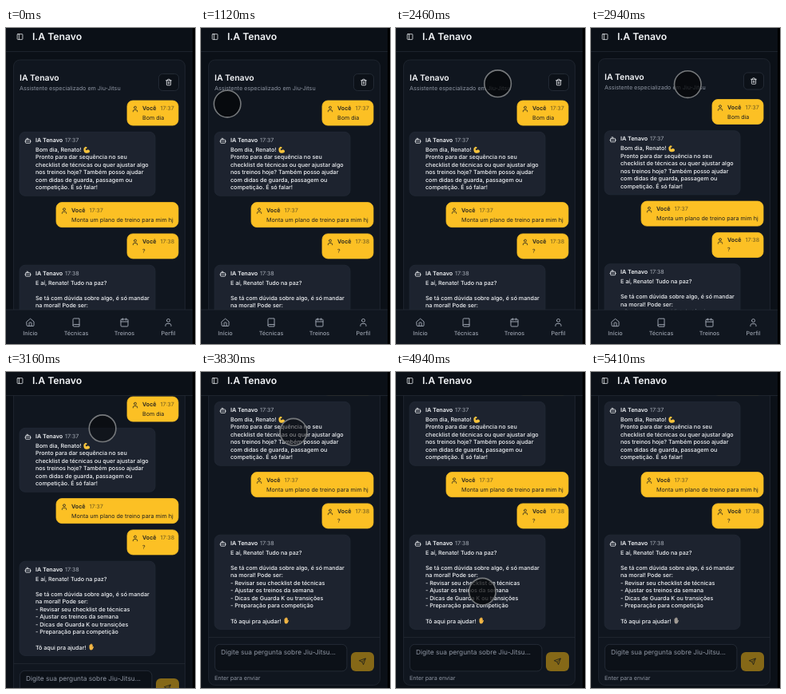
An HTML page that plays this animation: 237 px wide and 396 px high, repeating every 7.26 s.

```html
<!DOCTYPE html>
<html lang="pt-BR">
<head>
<meta charset="utf-8">
<title>Chat</title>
<style>
  html, body { margin: 0; height: 100%; overflow: hidden; background: #000; }
  svg { display: block; width: 100vw; height: 100vh; font: 7.15px Inter, sans-serif; text-rendering: geometricPrecision; }
</style>
</head>
<body>
<svg id="stage" viewBox="0 0 237 396"></svg>
<script>
const LOOP = 7260;
const BOT = 'IA Tenavo';
const WHITE = '#f5f7fa', MUTED = '#8f96a3', AMBER = '#fcc024', INK = '#20201f';
const PAGE = '#0b1017', CARD = '#10161f', FIELD = '#0c1118', LINE = '#222933', EDGE = '#29303b';
const LINE_HEIGHT = 9.55, GAP = 8.3;

// Icons on a 24-unit grid
const icons = {
  panel: 'M5 3h14a2 2 0 0 1 2 2v14a2 2 0 0 1-2 2H5a2 2 0 0 1-2-2V5a2 2 0 0 1 2-2zM9 3v18',
  trash: 'M3 6h18M19 6v14a2 2 0 0 1-2 2H7a2 2 0 0 1-2-2V6m3 0V4a2 2 0 0 1 2-2h4a2 2 0 0 1 2 2v2M10 11v6M14 11v6',
  user: 'M19 21v-2a4 4 0 0 0-4-4H9a4 4 0 0 0-4 4v2M8 7a4 4 0 1 0 8 0a4 4 0 1 0-8 0',
  bot: 'M12 8V4H8M6 8h12a2 2 0 0 1 2 2v8a2 2 0 0 1-2 2H6a2 2 0 0 1-2-2v-8a2 2 0 0 1 2-2zM2 14h2M20 14h2M15 13v2M9 13v2',
  home: 'M15 21v-8a1 1 0 0 0-1-1h-4a1 1 0 0 0-1 1v8M3 10l9-7.5 9 7.5v9a2 2 0 0 1-2 2H5a2 2 0 0 1-2-2z',
  book: 'M4 19.5v-15A2.5 2.5 0 0 1 6.5 2H20v20H6.5a2.5 2.5 0 0 1 0-5H20',
  calendar: 'M8 2v4M16 2v4M3 10h18M5 4h14a2 2 0 0 1 2 2v14a2 2 0 0 1-2 2H5a2 2 0 0 1-2-2V6a2 2 0 0 1 2-2z',
  send: 'M22 2L15 22l-4-9-9-4zM22 2L11 13'
};

const icon = (name, cx, cy, size, color) =>
  `<path d="${icons[name]}" transform="translate(${cx - size / 2} ${cy - size / 2}) scale(${size / 24})"
    fill="none" stroke="${color}" stroke-width="2" stroke-linecap="round" stroke-linejoin="round"/>`;
const text = (x, y, str, color, attrs = '') => `<text x="${x}" y="${y}" fill="${color}" ${attrs}>${str}</text>`;
const box = (x, y, w, h, r, fill, stroke = 'none') =>
  `<rect x="${x}" y="${y}" width="${w}" height="${h}" rx="${r}" fill="${fill}" stroke="${stroke}" stroke-width=".8"/>`;
const rule = (x, y, w) => box(x, y, w, .8, 0, LINE);

const biceps = '<path transform="translate(96 18)" d="M1.5 2.5l2-2 2 .4-.3 1.7-1.6.4.8 2.1c1-1.3 3.6-1.5 4.5.4.7 1.8-1 3-3.3 3-3.2 0-4.6-1.6-4.1-6z" fill="#f7c33c"/>';
const hand = '<path id="hand" transform="translate(104 103)" d="M.5 5.8v-3.6q.6-.8 1 0v-1.2q.6-.8 1.1 0v-.4q.6-.7 1.1 0v1q.6-.6 1 0v3l.8-.8q.8 0 .5.8l-1.5 3q-2 1.4-3.4 0z"/>';

const botMessage = (time, lines, emoji) => {
  const height = 22.7 + lines.length * LINE_HEIGHT;
  return {
    height,
    svg: box(17, 0, 170, height, 7, '#1d232f', '#232a36')
      + icon('bot', 27.5, 11, 9, WHITE)
      + text(37, 12.4, BOT, WHITE, 'font-weight="600"')
      + text(74, 12.4, time, '#a9afb9')
      + lines.map((line, i) => text(37, 24.4 + i * LINE_HEIGHT, line, WHITE, 'font-weight="500"')).join('')
      + emoji
  };
};

const userMessage = (x, time, line) => ({
  height: 31,
  svg: box(x, 0, 216 - x, 31, 7, AMBER, AMBER)
    + icon('user', x + 10, 10.5, 9, INK)
    + text(x + 19, 12, 'Você', INK, 'font-weight="600"')
    + text(x + 41.5, 12, time, '#6f5a20')
    + text(x + 19, 24, line, INK)
});

function stack(y, messages) {
  return messages.map(({ height, svg }) => {
    const group = `<g transform="translate(0 ${y})">${svg}</g>`;
    y += height + GAP;
    return group;
  }).join('');
}

const chat = stack(91, [
  userMessage(152, '17:37', 'Bom dia'),
  botMessage('17:37', [
    'Bom dia, Renato!',
    'Pronto para dar sequência no seu',
    'checklist de técnicas ou quer ajustar algo',
    'nos treinos hoje? Também posso ajudar',
    'com didas de guarda, passagem ou',
    'competição. É só falar!'
  ], biceps),
  userMessage(63, '17:37', 'Monta um plano de treino para mim hj'),
  userMessage(152, '17:38', '?'),
  botMessage('17:38', [
    'E aí, Renato! Tudo na paz?', '',
    'Se tá com dúvida sobre algo, é só mandar',
    'na moral! Pode ser:',
    '- Revisar seu checklist de técnicas',
    '- Ajustar os treinos da semana',
    '- Dicas de Guarda K ou transições',
    '- Preparação para competição', '',
    'Tô aqui pra ajudar!'
  ], hand)
]);

const page = box(9.5, 40, 215, 445.5, 8, CARD, LINE)
  + text(17, 66, BOT, WHITE, 'font-size="10.4" font-weight="600"')
  + text(17, 78, 'Assistente especializado em Jiu-Jitsu', MUTED)
  + box(191.5, 57.5, 25, 21, 5, FIELD, EDGE)
  + icon('trash', 204, 68, 9, WHITE)
  + chat
  + rule(9.5, 425, 215)
  + box(17.4, 434.4, 165.5, 33.5, 6, FIELD, EDGE)
  + text(25, 447, 'Digite sua pergunta sobre Jiu-Jitsu...', MUTED, 'font-size="8.3"')
  + box(188, 444, 29, 24, 6, '#856817')
  + icon('send', 202.5, 456, 9, '#15181a')
  + text(17, 479.4, 'Enter para enviar', MUTED);

const header = box(0, 0, 234, 29.5, 0, PAGE)
  + rule(0, 29, 234)
  + icon('panel', 17.5, 11, 9, WHITE)
  + text(33, 15.4, 'I.A Tenavo', WHITE, 'font-size="12.2" font-weight="600"');

const tabs = [['home', 30.5, 'Início'], ['book', 88, 'Técnicas'], ['calendar', 148.5, 'Treinos'], ['user', 203.5, 'Perfil']];
const nav = box(0, 353, 234, 43, 0, CARD) + rule(0, 352.6, 234)
  + tabs.map(([name, x, label]) => icon(name, x, 369, 12, '#9aa1ad')
    + text(x, 384.6, label, '#9aa1ad', 'font-weight="500" text-anchor="middle"')).join('');

document.getElementById('stage').innerHTML = box(0, 0, 234, 396, 0, PAGE)
  + `<g id="page">${page}</g><g>${header}</g><g id="nav">${nav}</g>
     <circle id="cursor" r="16.8" fill="#050608" stroke="#75787b" stroke-width="1.6"/>`;

const [pageEl, navEl, cursorEl, handEl] = ['page', 'nav', 'cursor', 'hand'].map(id => document.getElementById(id));

const ramp = (t, start, end) => Math.min(1, Math.max(0, (t - start) / (end - start)));
const easeIn = p => p * p;
const easeOut = p => 1 - (1 - p) ** 2;

// Waypoints of the pointer: time, x, y
const path = [
  [1050, 4, 102], [1380, 139, 70], [1850, 141, 68], [2740, 121.5, 70.5], [3690, 120.5, 71],
  [3830, 116, 75], [4460, 68, 191], [5140, 125, 310], [5410, 172, 416]
];

function pointerAt(t) {
  const i = Math.max(1, path.findIndex(([time]) => time > t));
  const [t0, x0, y0] = path[i - 1], [t1, x1, y1] = path[i];
  const p = ramp(t, t0, t1);
  return [x0 + (x1 - x0) * p, y0 + (y1 - y0) * p];
}

function draw(now) {
  const t = now % LOOP;
  const scroll = 60 * easeIn(ramp(t, 2900, 3160)) + 33 * easeOut(ramp(t, 3690, 3830));
  const dragging = ramp(t, 2940, 3160) - ramp(t, 3830, 4390);
  pageEl.setAttribute('transform', `translate(0 ${-scroll})`);
  navEl.setAttribute('transform', `translate(0 ${44 * ramp(t, 2940, 3160)})`);
  cursorEl.setAttribute('transform', `translate(${pointerAt(t)})`);
  cursorEl.setAttribute('fill-opacity', .72 - .25 * dragging);
  cursorEl.setAttribute('visibility', t >= 1050 && t < 5410 ? 'visible' : 'hidden');
  handEl.setAttribute('fill', t < 5140 ? '#f2b544' : '#a09a94');
  requestAnimationFrame(draw);
}
draw(performance.now());
</script>
</body>
</html>
```
